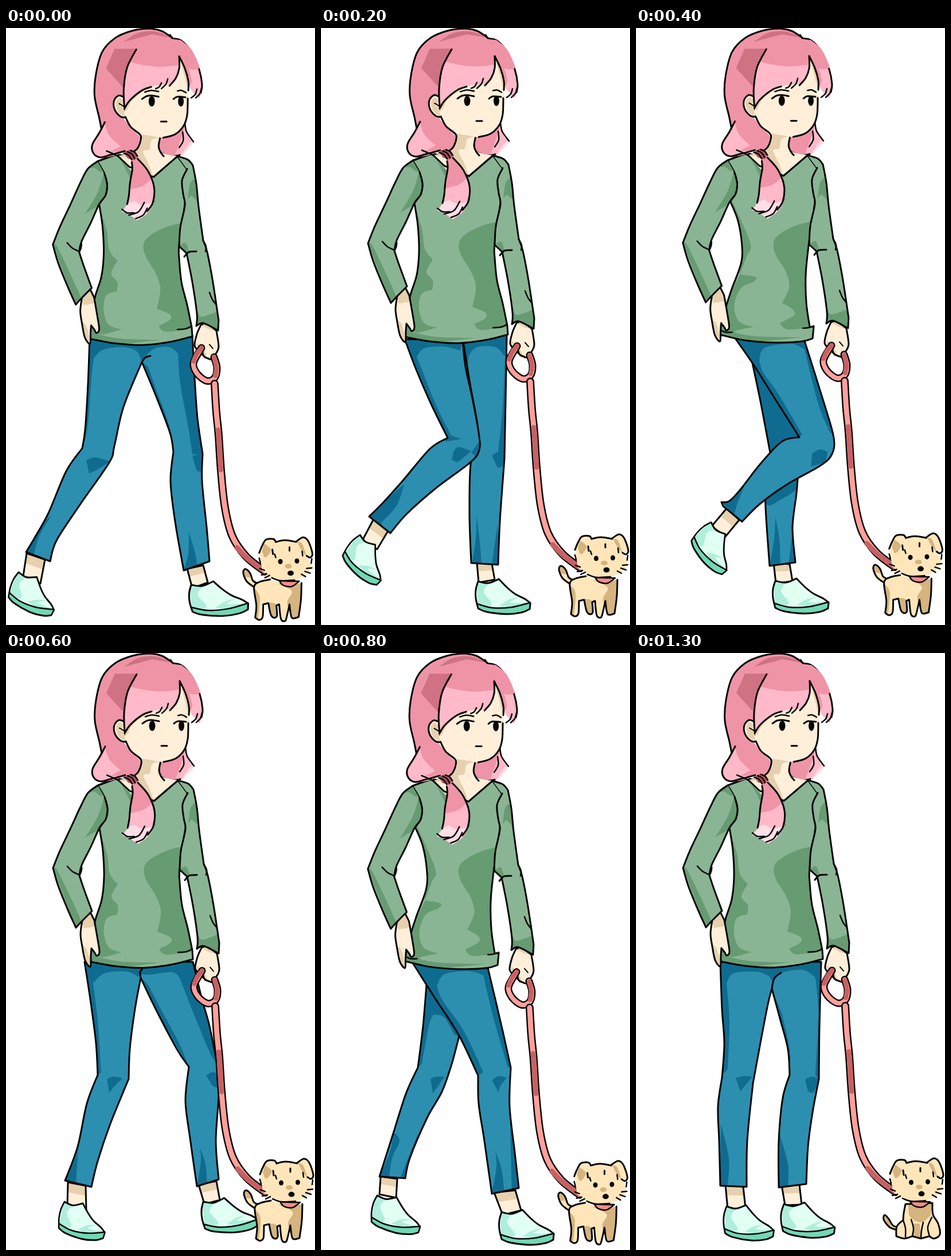
These frames come from a looping animation (539x1040 px, 1500 ms). An HTML page:

```html
<!DOCTYPE html>
<html lang="en">
<head>
<meta charset="utf-8">
<title>Walking the dog</title>
<style>
html, body { margin: 0; width: 100%; height: 100%; overflow: hidden; background: #fff; }
svg { display: block; width: 100%; height: 100%; }
</style>
</head>
<body>
<svg id="stage" viewBox="0 0 539 1040"></svg>
<script>
const INK = '#050505', PINK = '#ffb9c9', ROSE = '#ef94a6', WINE = '#cf7283',
  SKIN = '#ffefd9', TAN = '#e6d0ae', GREEN = '#8ab594', MOSS = '#679b72',
  BLUE = '#2c8faf', NAVY = '#0f6c90', CREAM = '#ffe6ba', BROWN = '#d5b47f';

// Smooth curve through points; "/" marks a corner.
function curve(text, closed) {
  let last = null, d = '';
  for (const run of text.split('/')) {
    const n = run.trim().split(/\s+/).map(Number), p = last ? [last] : [];
    for (let i = 0; i < n.length; i += 2) p.push([n[i], n[i + 1]]);
    if (!last) d = 'M' + p[0];
    for (let i = 0; i < p.length - 1; i++) {
      const a = p[i - 1] || p[i], b = p[i], c = p[i + 1], e = p[i + 2] || c;
      const k = j => [(b[j] + (c[j] - a[j]) / 6).toFixed(1), (c[j] - (e[j] - b[j]) / 6).toFixed(1)];
      const x = k(0), y = k(1);
      d += `C${x[0]} ${y[0]} ${x[1]} ${y[1]} ${c}`;
    }
    last = p[p.length - 1];
  }
  return d + (closed ? 'Z' : '');
}
const fill = (color, pts) => `<path d="${curve(pts, true)}" fill="${color}"/>`;
const line = (pts, w = 3, color = INK) =>
  `<path d="${curve(pts)}" fill="none" stroke="${color}" stroke-width="${w}"/>`;
const dot = (x, y, rx, ry, color = INK) =>
  `<ellipse cx="${x}" cy="${y}" rx="${rx}" ry="${ry}" fill="${color}"/>`;

let clips = 0;
// Filled shape with clipped shading and an outline on top.
function part(pts, color, shades = [], outline = null, w = 3) {
  const d = curve(pts, true), id = 'c' + clips++;
  return `<clipPath id="${id}"><path d="${d}"/></clipPath><path d="${d}" fill="${color}"/>` +
    `<g clip-path="url(#${id})">${shades.map(s => fill(...s)).join('')}</g>` +
    (outline === null ? `<path d="${d}" fill="none" stroke="${INK}" stroke-width="${w}"/>`
      : outline && line(outline, w));
}
const band = (pts, w, color) => line(pts, w + 5) + line(pts, w, color);

function shoe(x, y, turn, sx) {
  return `<g transform="translate(${x} ${y}) rotate(${turn}) scale(${sx} 1)">` +
    part('0 0/-4 14 -4 30 0 47/15 53 50 57 78 54 92 48/93 38/84 31 66 22 52 11 37 -4/18 3 0 0', '#e2fff4', [
      ['#aeeeda', '-3 0/18 4/10 18 23 36 22 42/0 44'],
      ['#aeeeda', '38 42/55 32 72 28/58 37 93 37/60 46'],
      ['#70d9b3', '-3 39/25 46 60 45 95 37/95 60/0 60']
    ]) + line('-2 39/25 46 60 45 93 37', 2.5) + '</g>';
}

function ankle(pts) {
  const [a, b, c, d, e, f, g, h] = pts.split(' ').map(Number);
  const m = (p, q) => (p + (q - p) * .42).toFixed(1);
  return part(`${a} ${b}/${c} ${d}/${e} ${f}/${g} ${h}`, SKIN,
    [[TAN, `${a} ${b}/${m(a, c)} ${m(b, d)}/${m(g, e)} ${m(h, f)}/${g} ${h}`]]);
}
const jeans = (pts, ...dark) => part(pts, BLUE, dark.map(s => [NAVY, s]));

const legs = [
  ankle('36 915 30 955 60 968 68 926') + ankle('316 942 325 976 352 966 344 936') +
  shoe(22, 948, 22, .88) + shoe(323, 970, -3, 1.05) +
  jeans('146 538/143 620 138 700 133 732/105 772 74 845 50 888 35 913/77 929/88 893 128 832 180 757 189 728 205 660 237 582/262 642 286 705 292 738/287 790 295 860 310 945/355 929/350 870 342 790 343 742/334 680 329 610 325 535',
    '146 535/140 640 133 735/143 690 149 610 153 575/170 560 205 556 228 563 236 580/242 573/260 558 285 556 300 567/304 620 317 690 325 742/345 745/328 530',
    '140 753/155 748 181 755/160 769 145 776', '325 745/342 742/342 776/332 770',
    '35 914/52 876 80 848/58 885 48 920', '310 945/318 915 319 878/330 915 334 940',
    '237 582/262 642 292 738/284 690 260 625 248 590') + line('237 582 243 574 252 571'),

  ankle('272 932 275 966 303 961 298 933') + ankle('92 855 72 893 98 908 117 876') +
  shoe(68, 883, 40, .85) + shoe(274, 964, 0, .98) +
  jeans('247 540/260 620 274 700 270 742/261 760 259 850 262 932/309 935/312 860 320 750/322 650 324 535',
    '247 535/253 610/258 570/272 556 304 556 321 572/324 535', '298 745/310 738 321 740/317 762 308 766',
    '263 935/270 890 271 850/277 895 280 935', '321 570/317 660 309 738/321 745', '298 935/308 865/311 935') +
  jeans('146 542/166 595 192 655 221 714/190 733 144 787 110 825 84 851/121 880/150 846 200 802 260 757 276 735 275 705 264 645 252 590 247 544',
    '146 540/166 595 221 714/228 712/200 655 178 600 167 573/180 558 215 555 243 562/248 540',
    '231 738/240 730 262 737/250 747 238 756 228 752', '84 851/110 825 145 795/132 832 105 862/108 873',
    '221 714/218 720 245 716/228 710', '262 740/276 720/273 748'),

  ankle('240 932 244 967 273 964 268 934') + ankle('158 837 132 868 156 886 180 857') +
  shoe(131, 861, 47, .86) + shoe(243, 963, 0, 1) +
  jeans('200 570/216 645 234 740/227 790 226 835 233 937/278 931/273 870 280 810 284 760/284 713/245 630',
    '195 565/235 745/225 755/284 713/245 630', '226 830/230 805 284 772/284 800 235 832',
    '233 937/241 890 243 852/250 890 252 937', '266 935/276 850/278 931') +
  jeans('174 542/206 588 240 642 285 713/255 720 218 758 182 804 163 824 149 826/152 833/185 860/215 830 262 796 322 762 342 742 345 714 330 660 293 542',
    '174 540/206 588 285 713/290 708/250 640 222 600 215 578/225 557 270 550 294 560/318 655 338 704/345 710/293 535',
    '307 742/320 734 334 738/329 755 305 764', '149 826/190 795/175 834 172 848'),

  ankle('108 922 107 963 140 970 139 928') + ankle('336 926 346 960 373 953 367 920') +
  shoe(102, 956, 12, .86) + shoe(344, 956, -4, 1) +
  jeans('137 538/148 610 157 680 160 735/141 785 125 860 103 919/149 930/160 885 182 820 214 742/216 690 225 620 235 566/260 618 298 690 319 721/313 780 321 845 333 929/371 917/366 850 371 770 369 720/355 650 341 600 326 538',
    '137 535/148 610 160 735/166 730/160 640 152 575/172 558 210 555 231 564/237 560/255 560 290 556 303 566/328 630 357 700/372 722/326 535',
    '176 742/188 738 203 741/190 754 180 766', '349 736/360 730 371 734/370 756 360 754',
    '103 919/123 875 129 845/125 880 122 928', '333 929/340 885 338 862/348 890 351 929',
    '235 566/260 618 319 721/302 680 270 620 248 578') + line('235 566 234 556 238 550'),

  ankle('104 912 102 943 131 949 133 916') + ankle('302 940 317 979 349 971 339 936') +
  shoe(98, 945, 12, .91) + shoe(315, 974, 0, .98) +
  jeans('185 565/178 650 169 722/148 768 125 840 102 912/147 915/155 880 185 810 211 764 228 716 241 667/205 590',
    '185 560/178 650 169 722/176 716/188 650 196 630/215 635 232 664/241 668/205 590',
    '191 742/200 738 215 738/204 755 195 767', '102 912/120 870 127 835/137 850 124 880 119 914', '138 915/170 835/149 915') +
  jeans('160 540/198 600 240 665 274 736/275 785 285 850 298 942/345 932/338 870 329 790 331 722/315 650 289 540',
    '160 537/198 600 274 736/283 730/250 660 212 605 202 580/215 560 255 554 283 561/302 640 326 722/334 722/289 535',
    '298 744/310 737 324 740/313 754 310 766', '298 942/306 895 304 867/315 900 320 942', '333 935/329 785/345 932'),

  ankle('156 927 160 969 191 967 187 930') + ankle('254 927 260 962 289 961 285 926') +
  shoe(158, 964, 3, .91) + shoe(258, 960, 2, .97) +
  jeans('147 538/150 620 154 680 150 740/143 790 145 850 147 928/193 930/194 850 204 750/215 690 230 612 237 585/252 640 265 690 268 735/256 775 249 850 249 931/297 925/300 860 308 800 319 742/320 650 323 538',
    '147 535/150 620 151 735/160 725/163 640 158 575/170 558 210 555 232 563/240 575/252 558 290 552 313 565/318 630 313 735/320 745/323 535',
    '174 740/188 737 203 738/190 754 182 764', '295 743/307 738 319 742/310 765 300 764',
    '147 928/148 820/162 880 160 928', '249 931/251 840/265 890 265 930',
    '237 585/252 640 268 735/268 690 255 630') + line('237 585 241 567 253 557')
];

const wideShade = [
  [MOSS, '310 337/282 344 254 358 241 373 244 395 262 425 270 452 264 486/287 496 286 506 267 516/280 526 328 520/330 480/304 400'],
  [MOSS, '160 300/176 350 181 385 195 403/184 425 195 440 194 456/175 464 171 490 180 514 202 522/172 530 160 530 202 538 270 540/140 555/145 500 166 440']
];
const slimShade = [
  [MOSS, '310 337/282 344 254 358 241 373 244 395 262 425 268 452 256 480/275 492 276 502 252 515/265 526 310 522/299 480/304 400'],
  [MOSS, '168 300/200 375 195 395/182 430/210 435 205 444/183 455 172 485 180 512 205 522/172 530 210 538 290 540/140 555/150 500 182 430']
];
const collar = '/317 245/300 222/258 258/213 222/193 219/160 231/172 252 177 272 174 290/';
const neckShade = [MOSS, '195 216/207 240 220 265/214 300/224 320/262 300/225 232'];
const torsos = [
  part('163 305/169 345 171 390 167 430 156 465 149 500 146 538/190 546 240 549 290 543 326 534/325 519/317 480 307 440 303 400 303 375 313 305' + collar + '163 305',
    GREEN, [...wideShade, neckShade]) + line('300 522 314 521 325 516', 2.5),
  part('165 303/178 335 185 375 184 410 166 460 152 505 146 535/190 545 240 549 290 547 309 542/311 521/304 522/298 480 297 430 303 372 313 305' + collar + '165 303',
    GREEN, [...slimShade, neckShade]) + line('292 524 302 523 311 520', 2.5) + line('149 528 157 531 168 531', 2.5)
];

const leftRim = '160 231 143 244 130 268 112 307 94 345 82 375/91 406 108 448 122 479/134 466 150 450/147 442 136 412 128 388/132 370 148 338 163 305';
const hands =
  part('133 466/130 490 133 512 138 536 147 547 148 528 149 515/155 523 158 528 163 522 160 500 154 466/146 450', SKIN,
    [[TAN, '130 465/150 450/156 474 136 480'], [TAN, '132 510/140 515 148 540/147 550 138 540']]) +
  part('341 514/334 530 330 550 338 560/348 570/360 574 366 566/372 552 368 524/350 510', SKIN,
    [[TAN, '340 514/350 508/368 525/356 522'], [TAN, '333 545/345 556 352 570/335 565']]) +
  line('344 560 347 570 355 572', 2) + line('356 548 362 555', 2);
const arms =
  part(leftRim + ' 174 290/177 270 172 252', GREEN, [
    [MOSS, '172 248/160 285 138 322/165 306/178 285'], [MOSS, '142 243/160 231/173 240 168 250 155 242'],
    [MOSS, '82 375/89 378 106 412 126 455 131 468/122 480']
  ], leftRim + ' 174 290 177 272 172 251') + line('193 219 178 224 160 231') +
  line('107 372 116 381 126 386', 2.5) + line('128 388 131 381 132 374', 3) +
  part('300 222 318 228 327 238/333 270 337 310 345 368/352 388 362 440 372 506/371 524/345 511 333 516/334 495 326 440 316 390/303 378/305 345 313 305/309 270 317 245', GREEN, [
    [MOSS, '318 297/322 270 331 260/335 300/324 290'], [MOSS, '303 378/314 372 320 386/316 400'],
    [MOSS, '333 516/336 490/342 500 372 490/372 526/345 510']
  ], '300 222 318 228 327 238/333 270 337 310 345 368/352 388 362 440 372 506/371 524/345 511 333 516/334 495 326 440 316 390/303 378') +
  line('317 244 308 264 310 288 313 307 305 345 303 378') +
  line('312 396 320 388 333 387') + line('345 368 350 378 349 387', 2.5) + line('356 458 361 470 367 478', 2.5);

const head =
  // hair behind the neck
  part('268 188/267 205 271 216/285 222 305 221 316 212 329 198/319 188 313 164', PINK,
    [[ROSE, '264 186/268 222/295 222/305 195 314 165'], ['#ffdce5', '306 222/320 200 330 196/320 212']], '') +
  line('268 190 267 205 271 216 290 222 304 220') + line('313 164 316 180 328 197', 2.5) + line('309 180 310 195 303 207', 2.5) +
  // neck
  part('232 175/238 195 228 214/195 222/220 248/258 258/300 222/273 216 267 205 270 185', SKIN, [
    [TAN, '228 170/255 186 272 189/255 194 251 210 240 214 250 236 258 258/235 238 226 220/200 224/222 250/190 222/228 212/238 195']
  ], '') + line('193 219 215 240/258 258/300 222', 3) + line('270 188 267 205 271 216 276 222') +
  // crown and left locks
  part('291 17/272 5 250 1 220 5 190 18 168 42 157 82 155 118 163 155 167 172/150 203 152 217 165 224 190 221 212 212 226 214 233 206 236 191 218 172 204 154/206 110/250 60/303 50/320 100 338 122/342 105 338 72 325 41 305 21', ROSE, [
    [WINE, '190 36/175 70/206 104/212 70 230 36'], [WINE, '206 24/230 9 260 6 291 17/255 11'],
    [PINK, '172 162/180 185 200 205/182 214/210 216/160 228/145 210'],
    [PINK, '160 165/170 178 180 186 182 205/150 225/140 200'],
    [PINK, '310 64/325 72 339 70/350 125/315 125']
  ], '291 17/272 5 250 1 220 5 190 18 168 42 157 82 155 118 163 155 167 175') +
  line('173 163 163 182 151 202 153 217 165 224 182 220 208 213') + line('176 213 188 218 196 222', 2.5) +
  line('287 12 291 18/307 22 325 42 338 72 343 98 341 112') +
  // ear and face
  part('207 120/197 117 189 126 190 141 200 153 210 155/222 130', SKIN, [[TAN, '198 120/192 130 196 146/208 154/205 138 199 132/212 130']], '207 120 197 117 189 126 190 141 200 153 210 155') +
  line('198 131 206 136 208 143', 2) +
  fill(SKIN, '208 132/209 152 219 172 235 184/255 187 275 191/296 184 311 170 317 152 320 115 317 85 303 50/285 60/240 80') +
  fill(TAN, '207 138/232 110 245 106/222 124 211 144') + fill(TAN, '304 52/318 88 319 112/314 90') +
  line('209 154 218 171 234 184 236 193 231 207 225 213') +
  line('275 190 296 184 311 169 317 150 318 122') +
  // fringe
  fill(PINK, '228 37/211 70 205 106 208 136/218 123 236 107 262 100 288 96 302 76 303 49/290 30') +
  fill(ROSE, '228 37/214 58/240 64 270 67 303 64/304 48/322 68 340 70/325 38 306 21/270 18 245 22') +
  fill(ROSE, '303 50/318 84 320 102/325 92 320 70') +
  line('228 37 212 68 206 105 207 136') + line('207 140 217 125 238 108 254 102') +
  line('262 105 268 102 272 95', 2.5) + line('272 105 280 97 283 88', 2.5) + line('286 100 297 87 303 70 303 49') +
  line('303 49 313 70 319 92 319 108') + line('324 121 331 115 334 106', 2.5) + line('332 121 339 114 342 104', 2.5) +
  // features
  line('243 111 254 108 267 110', 2.5) + line('300 109 307 108 315 112', 2.5) +
  line('238 123 246 118 256 117 267 119') + line('293 123 300 119 314 120') +
  dot(255, 127, 5.5, 9) + dot(306, 127, 5, 9) + line('271 162 281 162', 3) +
  // side tail
  part('213 218/221 236 219 260 215 288 212 306/203 318/214 322 230 333/248 320 258 302 260 279 250 252 232 230/226 216', ROSE, [
    [PINK, '210 280/238 274 254 262/266 280/255 320/225 335/200 320'],
    ['#ffdee7', '205 312/222 300 236 306 255 303/240 330 228 335/200 320']
  ], '') + line('230 226 248 247 259 275 257 302 247 317') +
  line('220 232 221 245 217 268 215 290 212 305') + line('203 314 212 320 224 320', 2.5) +
  line('215 324 232 318 242 302', 2.5) + line('227 330 240 324 247 312', 2.5) +
  fill('#b0505f', '206 216/218 211 230 221/225 229/213 226') +
  line('206 217 214 220 220 228', 2.5) + line('212 214 220 218 225 226', 2.5) + line('218 212 225 215 230 222', 2.5);

const leash =
  `<g>${band('364 570 369 588 365 606 351 611 334 598 328 580 342 554', 8, '#ff9f9a')}` +
  line('328 577 334 564 342 554', 8, '#c76163') + line('364 571 368 588 366 602', 8, '#c76163') +
  band('365 616 368 665 372 705 376 765 383 830 396 880 420 915 453 941', 9, '#ff9f9a') +
  line('371 696 373 715 376 765', 9, '#c76163') + line('404 900 424 920 453 941', 9, '#c76163') + '</g>';

const dogHead =
  fill(CREAM, '444 910/456 886 470 890/488 887 508 890/522 883 536 905/528 918/534 932 523 948 498 957 466 953 448 940') +
  part('443 909/448 897 455 886 469 886/472 890/465 904 455 918', CREAM, [[BROWN, '452 893/463 902 460 912 452 918/448 905']], '443 909 448 897 455 886 468 885 472 890') +
  part('508 889/520 882 529 889 536 910/526 918/518 906', CREAM, [[BROWN, '510 890/518 893 526 915/516 905']], '508 889 520 882 529 889 536 910 532 917 526 914') +
  line('472 890 488 887 508 890') +
  line('443 918 445 926', 2.5) + line('535 919 534 927', 2.5) + line('466 903 467 911', 3) + line('496 899 496 905', 3) +
  line('518 906 519 914', 2.5) + line('470 911 472 917', 2.5) +
  dot(494, 932, 6, 4, BROWN) + dot(480, 924, 4, 4.5) + dot(509, 923, 4, 4.5) + dot(498, 944, 5.5, 4.5) +
  line('444 936 452 939', 2.5) + line('447 947 456 945', 2.5) + line('453 952 461 948', 2.5) +
  line('535 935 526 936', 2.5) + line('532 944 523 941', 2.5) + line('524 950 517 946', 2.5) +
  line('465 952 480 957 505 956', 2.5);
const neckband = part('478 957/485 965 500 967 513 958/497 958', '#f58b8d', [], null, 2.5);

const dogs = [
  part('441 962/432 957 427 944 419 937 415 943 421 958 435 969', CREAM, [[BROWN, '415 935/426 938 427 952/416 950']]) +
  part('437 963/433 975 438 1000 436 1021/443 1025 449 1020 450 998/459 996/463 1015 468 1021 474 1018 473 1000/478 998/481 1023 488 1027 491 1020 496 998/500 1021/512 1020/516 990 517 961/495 964 462 955', CREAM, [
    [BROWN, '475 962/500 975 492 995 500 1025/520 1025/520 960'], [BROWN, '434 970/444 985 441 1025/434 1020'],
    [BROWN, '458 995/472 998 475 1022/464 1020']
  ], '462 955 444 959 434 968 438 1000 436 1021/443 1025 449 1020 450 998/459 996/463 1015 468 1021 474 1018 473 1000/478 998/481 1023 488 1027 491 1020 496 998/500 1021 512 1020/516 990 517 961') +
  neckband,
  part('462 1002/449 1000 441 988 434 981 432 989 442 1002 455 1007', CREAM, [[BROWN, '432 980/440 988 446 1001/430 995']]) +
  part('470 962/467 978 466 990/455 1001 454 1018/468 1022 482 1018/497 1022/512 1018/520 1022 530 1015 527 996 518 980 517 960', CREAM, [
    [BROWN, '475 962/478 984 497 994 514 982/516 960'], [BROWN, '482 996/484 1020/497 1022/495 996']
  ]) + line('480 989 484 1004 482 1018', 2.5) + line('501 994 498 1008 497 1021', 2.5) + line('516 985 509 1002 512 1018', 2.5) +
  line('466 990 470 1004 470 1019', 2.5) + neckband
];

const poses = [
  { torso: 0, dog: 0, sx: .997, sy: 1.006 },
  { torso: 0, dog: 0, sx: 1, sy: 1 },
  { torso: 1, dog: 0, sx: .997, sy: .998 },
  { torso: 0, dog: 0, sx: 1, sy: .999 },
  { torso: 1, dog: 0, sx: .997, sy: 1.003 },
  { torso: 0, dog: 1, sx: 1, sy: .998 }
];

const stage = document.getElementById('stage');
const group = (name, html) => `<g class="${name}">${html}</g>`;
const set = (name, list) => list.map(html => group(name, html)).join('');
stage.innerHTML = '<g stroke-linecap="round" stroke-linejoin="round">' + set('legs', legs) +
  group('body', set('torso', torsos) + hands + arms + head + leash + set('dog', dogs) + dogHead) + '</g>';

const all = name => [...stage.querySelectorAll('.' + name)];
const parts = { legs: all('legs'), torso: all('torso'), dog: all('dog') };
const body = all('body')[0];
const show = (list, n) => list.forEach((el, i) => { el.style.display = i === n ? '' : 'none'; });

let shown = -1;
function draw(ms) {
  const n = Math.min(5, Math.floor(ms % 1500 / 200));
  if (n === shown) return;
  shown = n;
  const p = poses[n];
  show(parts.legs, n);
  show(parts.torso, p.torso);
  show(parts.dog, p.dog);
  body.setAttribute('transform', `scale(${p.sx} ${p.sy})`);
}

const start = performance.now();
function tick() {
  draw(performance.now() - start);
  requestAnimationFrame(tick);
}
tick();
</script>
</body>
</html>
```
